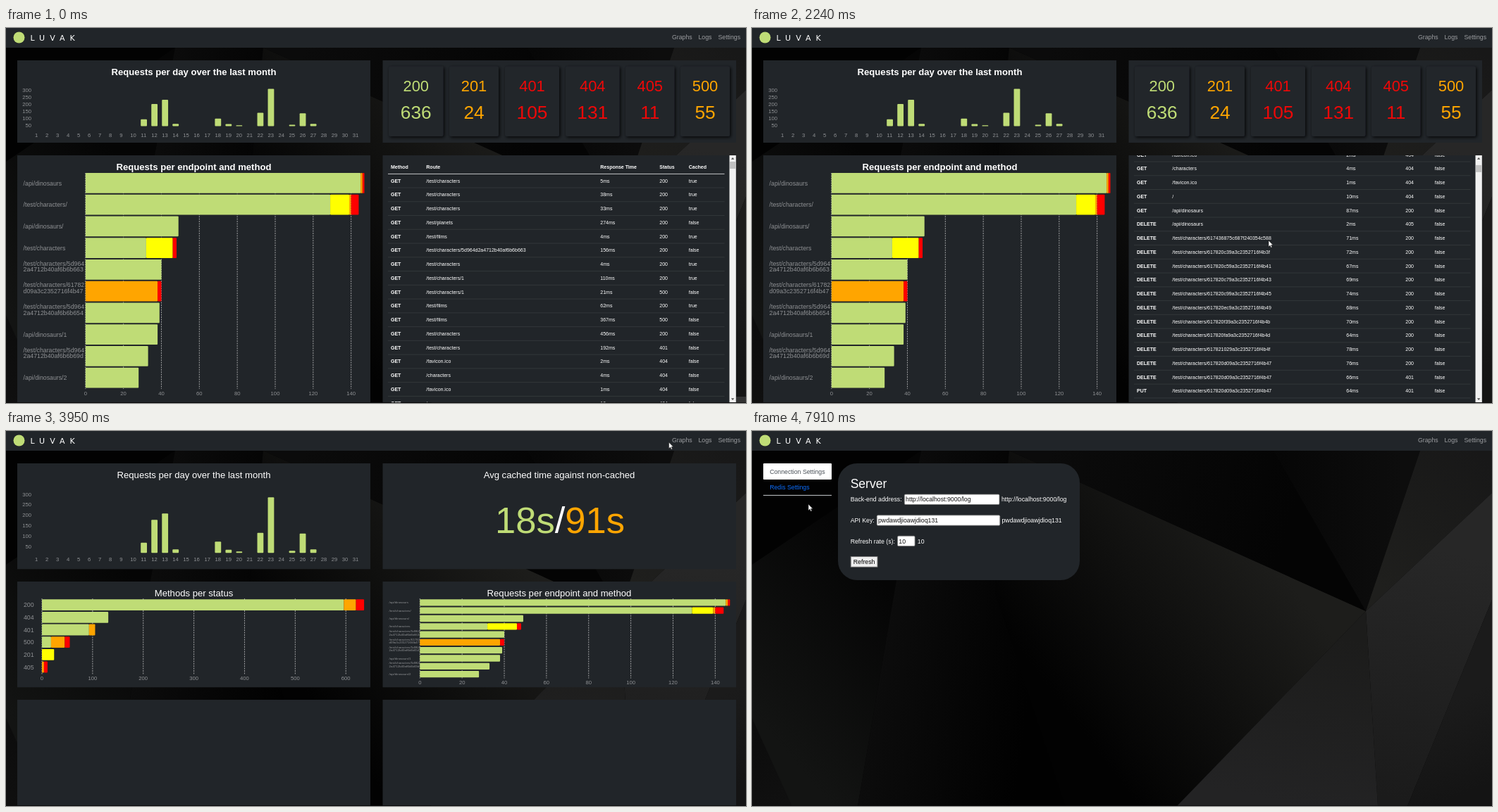
An HTML page for the animation above (7.99 s loop, 1050x533 px).

```html
<!DOCTYPE html>
<html lang="en">
<head>
<meta charset="utf-8">
<title>Dashboard</title>
<style>
html, body { margin: 0; width: 100%; height: 100%; overflow: hidden; background: #000; }
svg { display: block; width: 1050px; height: 533px; }
text { font-family: "Liberation Sans", Arial, sans-serif; white-space: pre; }
</style>
</head>
<body>
<svg id="stage" viewBox="0 0 1050 533"></svg>
<script>
const LOOP = 7990;
const GREEN = '#bfdc76', ORANGE = '#ffa500', YELLOW = '#ffff00', RED = '#ff0000';
const PANEL = '#212529', MUTED = '#8f9194', LINK = '#9b9da0';
const COLORS = { g: GREEN, o: ORANGE, y: YELLOW, r: RED };

// ---------- drawing helpers ----------
const rect = (x, y, w, h, fill, extra = '') =>
  `<rect x="${x}" y="${y}" width="${w}" height="${h}" fill="${fill}" ${extra}/>`;

// y is the vertical middle of the capitals
const text = (x, y, str, size, fill = '#fff', anchor = 'start', extra = '') =>
  `<text x="${x}" y="${(y + size * 0.355).toFixed(2)}" font-size="${size}" fill="${fill}" text-anchor="${anchor}" ${extra}>${str}</text>`;

const line = (x1, y1, x2, y2, stroke, extra = '') =>
  `<line x1="${x1}" y1="${y1}" x2="${x2}" y2="${y2}" stroke="${stroke}" ${extra}/>`;

const BOLD = 'font-weight="700"';
const title = (x, y, str, extra) => text(x, y, str, 13.125, '#fff', 'middle', extra);

// ---------- backdrop ----------
let gradients = 0;
function facet(points, from, to, axis) {
  const id = 'facet' + gradients++;
  const [x1, y1, x2, y2] = axis;
  return `<linearGradient id="${id}" gradientUnits="userSpaceOnUse" x1="${x1}" y1="${y1}" x2="${x2}" y2="${y2}">
    <stop stop-color="${from}"/><stop offset="1" stop-color="${to}"/></linearGradient>
    <polygon points="${points}" fill="url(#${id})"/>`;
}

function backdrop() {
  return rect(0, 0, 1050, 533, '#020202') +
    facet('240,28 0,190 0,533 150,533 205,212', '#131413', '#050505', [0, 400, 200, 230]) +
    facet('0,408 0,533 57,533', '#0c0c0c', '#101010', [0, 420, 50, 533]) +
    facet('240,28 365,28 345,230 445,533 150,533 205,212', '#0c0c0c', '#010101', [180, 300, 400, 330]) +
    facet('365,28 871,256 603,533 445,533 345,230', '#1d1d1b', '#020202', [760, 210, 470, 430]) +
    facet('365,28 740,28 871,256', '#0b0b0b', '#040404', [420, 40, 760, 140]) +
    facet('740,28 948,28 871,256', '#060606', '#0d0d0d', [740, 100, 920, 100]) +
    facet('948,28 1050,28 1050,88 871,256', '#1f1f1d', '#181818', [890, 220, 1040, 40]) +
    facet('871,256 1050,88 1050,240 930,533 888,533', '#272727', '#1b1b1b', [980, 170, 900, 520]) +
    facet('1050,240 1050,533 930,533', '#1b1b1b', '#141414', [1000, 380, 1050, 500]) +
    facet('871,256 888,533 603,533', '#1c1c1b', '#232324', [830, 290, 780, 533]);
}

// ---------- navigation ----------
const LINKS = [['Graphs', 945, 974], ['Logs', 982.5, 1002], ['Settings', 1010.5, 1042]];

function navbar() {
  return rect(0, 0, 1050, 28, PANEL) +
    `<circle cx="18.5" cy="13.5" r="8" fill="${GREEN}"/>` +
    `<text x="34.5" y="18.4" font-size="11" fill="#fff" letter-spacing="7" style="font-family:'DejaVu Sans',sans-serif">LUVAK</text>` +
    LINKS.map(([name, x]) => text(x, 12.5, name, 8.75, LINK, 'start', 'class="link"')).join('');
}

// ---------- charts ----------
const DAY_HEIGHTS = { 11: 14.5, 12: 47, 13: 56, 14: 5, 18: 16, 19: 4.5, 20: 2, 22: 28.5, 23: 79, 25: 3, 26: 27.5, 27: 5 };

function dayChart(base, scale, firstTick, tickGap, labelY) {
  let out = '';
  const center = d => 195.6 + 15.03 * (d - 11);
  for (let i = 0; i < 6; i++) out += text(36, firstTick - i * tickGap, 50 * (i + 1), 7.66, MUTED, 'end');
  for (let d = 1; d <= 31; d++) out += text(center(d) - 4.4, labelY, d, 7.66, MUTED);
  for (const d in DAY_HEIGHTS) {
    const h = DAY_HEIGHTS[d] * scale;
    out += rect(center(d) - 4.4, base - h, 8.8, h, GREEN, `rx="${Math.min(1, h / 2)}"`);
  }
  return out;
}

// each row: label lines, then stacked segments such as "g145 o1"
const ENDPOINTS = [
  ['/api/dinosaurs', 'g145 o1 r1'],
  ['/test/characters/', 'g129 y10 o1 r4'],
  ['/api/dinosaurs/', 'g49'],
  ['/test/characters', 'g32 y14 r2'],
  ['/test/characters/5d964|2a4712b40af6b6b663', 'g40'],
  ['/test/characters/61782|d09a3c2352716f4b47', 'o38 r2'],
  ['/test/characters/5d964|2a4712b40af6b6b654', 'g39'],
  ['/api/dinosaurs/1', 'g38'],
  ['/test/characters/5d964|2a4712b40af6b6b69d', 'g33'],
  ['/api/dinosaurs/2', 'g28']
];
const STATUSES = [
  ['200', 'g596 o24 r16'], ['404', 'g131'], ['401', 'g93 o12'],
  ['500', 'g18 o27 r10'], ['201', 'y24'], ['405', 'o4 r7']
];

function barChart(rows, c) {
  let out = '';
  for (let v = 0; v <= c.max; v += c.step) {
    const x = c.x + v * c.unit;
    out += line(x, c.top, x, c.bottom, '#d8d8d8', 'stroke-width=".7" stroke-dasharray="2 1.4"');
    out += text(x, c.tickY, v, 7.66, MUTED, 'middle');
  }
  rows.forEach(([label, stack], i) => {
    const y = c.first + i * c.pitch;
    label.split('|').reverse().forEach((part, k) => {
      out += text(c.labelX, y - k * c.font, part, c.font, MUTED);
    });
    let x = c.x;
    for (const seg of stack.split(' ')) {
      const w = seg.slice(1) * c.unit;
      out += rect(x, y - c.bar / 2, w, c.bar, COLORS[seg[0]], `rx="${Math.min(1, w / 3)}"`);
      x += w;
    }
  });
  return out;
}

// ---------- log page ----------
const CARDS = [
  [543, 77.5, 200, 636, GREEN], [629, 70, 201, 24, ORANGE], [708, 77, 401, 105, '#ee0808'],
  [794, 76.5, 404, 131, '#ee0808'], [879, 69.5, 405, 11, '#ee0808'], [957, 70, 500, 55, ORANGE]
];

function statusCards() {
  return CARDS.map(([x, w, code, count, fill]) =>
    rect(x, 54.5, w, 99.5, PANEL, 'rx="2" filter="url(#shadow)"') +
    text(x + w / 2, 82.3, code, 21.875, fill, 'middle') +
    text(x + w / 2, 119.3, count, 26.25, fill, 'middle')).join('');
}

// method, route, milliseconds, status, cached; "~" is the shared route prefix
const LOG = `GET ~ 5 200 true
GET ~ 38 200 true
GET ~ 33 200 true
GET /test/planets 274 200 false
GET /test/films 4 200 true
GET ~/5d964d2a4712b40af6b6b663 156 200 false
GET ~ 4 200 true
GET ~/1 110 200 true
GET ~/1 21 500 false
GET /test/films 62 200 true
GET /test/films 367 500 false
GET ~ 456 200 false
GET ~ 192 401 false
GET /favicon.ico 2 404 false
GET /characters 4 404 false
GET /favicon.ico 1 404 false
GET / 10 404 false
GET /api/dinosaurs 87 200 false
DELETE /api/dinosaurs 2 405 false
DELETE ~/617436875c687f240354c588 71 200 false`.split('\n').map(r => r.split(' '));

const itemRoute = (a, b) => `~/61782${a}9a3c2352716f4b${b}`;
for (const spec of ['0c3 3f 72', '0c5 41 67', '0c7 43 69', '0c9 45 74', '0ec 49 68',
  '0f3 4b 70', '0fa 4d 64', '102 4f 78', '0d0 47 76', '0d0 47 66 401']) {
  const [a, b, ms, status = 200] = spec.split(' ');
  LOG.push(['DELETE', itemRoute(a, b), ms, status, 'false']);
}
for (const ms of [64, 65, 67, 67, 67, 67, 67, 65, 68, 66])
  LOG.push(['PUT', itemRoute('0d0', '47'), ms, 401, 'false']);

const COLUMNS = [546, 596.3, 843.3, 927.3, 968.7];
const ROW = 19.76;

function logTable() {
  let out = ['Method', 'Route', 'Response Time', 'Status', 'Cached']
    .map((h, i) => text(COLUMNS[i], 197.3, h, 7, '#fff', 'start', BOLD)).join('');
  out += line(542, 207.4, 1019.5, 207.4, '#d5d6d7', 'stroke-width=".9"');
  LOG.forEach(([method, route, ms, status, cached], r) => {
    const y = 217.1 + r * ROW;
    [method, route.replace('~', '/test/characters'), ms + 'ms', status, cached].forEach((cell, i) => {
      out += text(COLUMNS[i], y, cell, 7, '#fff', 'start', i ? '' : BOLD);
    });
    out += line(542, y + 9.9, 1019.5, y + 9.9, '#373b3e', 'stroke-width=".8"');
  });
  return out;
}

function scrollbar() {
  return rect(1026.5, 181, 9.3, 351, '#f1f1f1') +
    '<path d="M1031.1 184l2.2 2.8h-4.4zM1031.1 529l2.2-2.8h-4.4z" fill="#505050"/>' +
    rect(1027, 190, 8.3, 10, '#c1c1c1', 'id="thumb"');
}

function logPage() {
  return rect(16, 46, 501, 117, PANEL) + rect(534.5, 46, 501.5, 117, PANEL) +
    rect(16, 181, 501, 351, PANEL) + rect(534.5, 181, 501.5, 351, PANEL) +
    title(266.5, 62.3, 'Requests per day over the last month', BOLD) +
    dayChart(139.6, 0.671, 138.7, 10, 152) +
    statusCards() +
    title(266.5, 197.3, 'Requests per endpoint and method', BOLD) +
    barChart(ENDPOINTS, { x: 112.8, unit: 2.692, max: 140, step: 20, top: 206, bottom: 513, tickY: 519,
      first: 220.4, pitch: 30.74, bar: 28.8, labelX: 24.6, font: 8.75 }) +
    `<g clip-path="url(#tableClip)"><g id="rows">${logTable()}</g></g>` + scrollbar() +
    rect(1036, 524, 14, 9, '#333333', 'id="corner"');
}

// ---------- graph page ----------
function graphPage() {
  let out = '';
  for (const y of [46, 214, 382])
    out += rect(16, y, 501, 150.3, PANEL) + rect(534.5, y, 501.5, 150.3, PANEL);
  return out +
    title(266.5, 62.3, 'Requests per day over the last month') +
    dayChart(173.2, 1, 163.8, 14.8, 181.8) +
    title(785, 62.3, 'Avg cached time against non-cached') +
    text(786, 126.6, `<tspan fill="${GREEN}">18s</tspan>/<tspan fill="${ORANGE}">91s</tspan>`, 52.5, '#fff', 'middle') +
    title(266.5, 230.3, 'Methods per status') +
    barChart(STATUSES, { x: 51, unit: 0.7187, max: 600, step: 100, top: 238, bottom: 345.5, tickY: 351,
      first: 247.2, pitch: 17.66, bar: 15.8, labelX: 25, font: 8.75 }) +
    title(785, 230.3, 'Requests per endpoint and method') +
    barChart(ENDPOINTS, { x: 587.3, unit: 2.993, max: 140, step: 20, top: 238, bottom: 351.5, tickY: 357.3,
      first: 243.9, pitch: 11.3, bar: 9.3, labelX: 543.5, font: 4.4 });
}

// ---------- settings page ----------
function field(y, label, x, w, value, echoX) {
  return text(139.7, y, label, 8.75) +
    rect(x, y - 7.2, w, 14.4, '#fff', 'rx="1.5" stroke="#767676" stroke-width=".8"') +
    text(x + 1.8, y, value, 8.75, '#111') + text(echoX, y, value, 8.75);
}

function settingsPage() {
  return rect(16, 46, 97, 23, '#fff', 'rx="1"') +
    text(25.2, 57.6, 'Connection Settings', 8.75, '#495057') +
    text(25.2, 80.2, 'Redis Settings', 8.75, '#0d6efd') +
    line(16, 91.4, 113, 91.4, '#dee2e6', 'stroke-width=".9"') +
    rect(122, 46, 343, 166, PANEL, 'rx="27"') +
    text(139.7, 74.3, 'Server', 17.5) +
    field(97.3, 'Back-end address:', 216.3, 134.7, 'http://localhost:9000/log', 354) +
    field(127, 'API Key:', 177.2, 174.6, 'pwdawdjioawjdioq131', 354.5) +
    field(156.4, 'Refresh rate (s):', 206.5, 24.6, '10', 234.8) +
    rect(140.2, 178.6, 37.8, 14.6, '#efefef', 'stroke="#767676" stroke-width=".9"') +
    text(159.1, 186, 'Refresh', 8.75, '#000', 'middle');
}

// ---------- assembly ----------
const stage = document.getElementById('stage');
const PAGES = [logPage, graphPage, settingsPage];
stage.innerHTML = `<defs>
  <clipPath id="tableClip"><rect x="534" y="181" width="493" height="351"/></clipPath>
  <filter id="shadow" x="-20%" y="-20%" width="140%" height="140%">
    <feDropShadow dx="1.5" dy="1.5" stdDeviation="2" flood-color="#000" flood-opacity=".85"/></filter></defs>` +
  backdrop() + navbar() +
  PAGES.map(page => `<g class="page">${page()}</g>`).join('') +
  rect(0, 532.3, 1050, 0.7, '#0a0a0a') +
  `<path id="cursor" d="M0 0V9L2.1 7.1 3.4 10.2 4.9 9.6 3.6 6.6H6.3Z" fill="#fff" stroke="#111" stroke-width=".5"/>`;

const pages = stage.querySelectorAll('.page');
const links = stage.querySelectorAll('.link');
const [rows, thumb, corner, cursor] = ['rows', 'thumb', 'corner', 'cursor'].map(id => document.getElementById(id));

// ---------- motion ----------
const SHOW_GRAPHS = 3530, SHOW_SETTINGS = 7330;

// time, x, y of the pointer tip
const PATH = [
  [70, 1040, 521], [330, 730, 290], [500, 593, 189], [680, 670, 210], [820, 670, 210],
  [1170, 717, 262], [1560, 722, 270], [2240, 733, 302], [2760, 735, 304], [3120, 949, 17],
  [3260, 950, 17], [3390, 956, 16], [3900, 956, 16], [4290, 838, 16], [4560, 114, 100],
  [4760, 180, 203], [5000, 760, 180], [5100, 840, 163], [5330, 900, 55], [5650, 480, 306],
  [5900, 234, 290], [6080, 79, 335], [6320, 681, 305], [6500, 1014, 300], [6600, 1005, 180],
  [6690, 942, 211], [7050, 1026, 12], [7520, 1034, 10], [7570, 1030, 12], [7850, 110, 112], [7910, 80, 104]
];

function pointer(t) {
  const last = PATH[PATH.length - 1];
  if (t >= last[0]) return last.slice(1);
  const i = PATH.findIndex(p => p[0] > t);
  const [t0, x0, y0] = PATH[i - 1], [t1, x1, y1] = PATH[i];
  const k = (t - t0) / (t1 - t0);
  return [x0 + (x1 - x0) * k, y0 + (y1 - y0) * k];
}

// eight wheel notches, each eased over 200 ms
function scrollAt(t) {
  let sum = 0;
  for (let i = 0; i < 8; i++) {
    const k = Math.min(1, Math.max(0, (t - 1130 - i * 210) / 200));
    sum += k * (1.25 - 0.25 * k);
  }
  return sum * 54.85;
}

function render(t) {
  const current = t < SHOW_GRAPHS ? 0 : t < SHOW_SETTINGS ? 1 : 2;
  pages.forEach((p, i) => { p.style.display = i === current ? '' : 'none'; });

  const scroll = scrollAt(t);
  rows.setAttribute('transform', `translate(0 ${-scroll.toFixed(2)})`);
  thumb.setAttribute('y', 190 + scroll * 0.0165);
  corner.style.display = t < 70 ? '' : 'none';

  const shown = t >= 70;
  const [x, y] = shown ? pointer(t) : [0, 0];
  cursor.style.display = shown ? '' : 'none';
  cursor.setAttribute('transform', `translate(${x.toFixed(2)} ${y.toFixed(2)})`);
  links.forEach((link, i) => {
    const over = shown && y < 24 && x >= LINKS[i][1] - 4 && x <= LINKS[i][2] + 4;
    link.setAttribute('fill', over ? '#d3d4d6' : LINK);
  });
}

const start = performance.now();
function tick() {
  render((performance.now() - start) % LOOP);
  requestAnimationFrame(tick);
}
tick();
</script>
</body>
</html>
```
